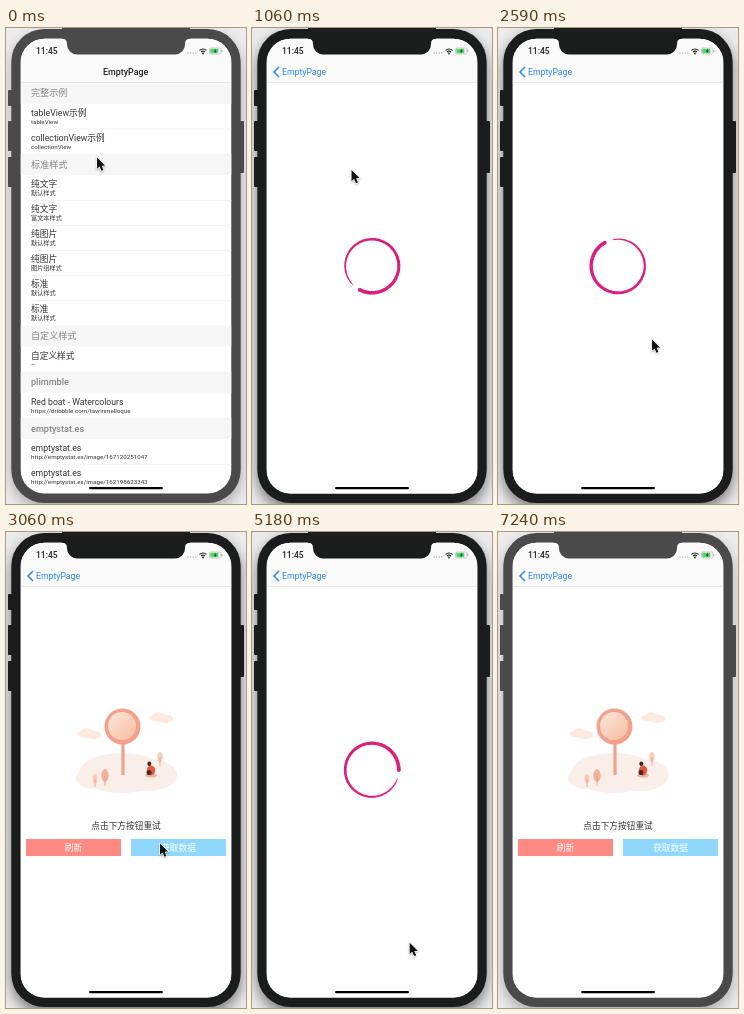
Write an HTML page with a canvas that moves like this. It is 240x476 px and loops after 8.29 s.

```html
<!DOCTYPE html>
<html lang="zh-CN">
<head>
<meta charset="utf-8">
<title>EmptyPage</title>
<style>
html, body { margin: 0; width: 100%; height: 100%; overflow: hidden; background: #ececec; }
canvas { display: block; width: 240px; height: 476px; }
</style>
</head>
<body>
<canvas id="stage"></canvas>
<script>
const LOOP = 8290;
const LEFT = 14.5, WIDTH = 211, TOP = 10.7, NAV = 54.5;
const BLUE = '#2b87f0', PINK = '#d91c7c';
const canvas = document.getElementById('stage');
const dpr = window.devicePixelRatio || 1;
canvas.width = 240 * dpr;
canvas.height = 476 * dpr;
const c = canvas.getContext('2d');

// Strings open a section; pairs are rows.
const LIST = [
  '完整示例', ['tableView示例', 'tableView'], ['collectionView示例', 'collectionView'],
  '标准样式', ['纯文字', '默认样式'], ['纯文字', '富文本样式'], ['纯图片', '默认样式'],
  ['纯图片', '图片组样式'], ['标准', '默认样式'], ['标准', '默认样式'],
  '自定义样式', ['自定义样式', '—'],
  'plimmble', ['Red boat - Watercolours', 'https://dribbble.com/tavrinmelloque'],
  'emptystat.es', ['emptystat.es', 'http://emptystat.es/image/167120251047'],
  ['emptystat.es', 'http://emptystat.es/image/162198623343']
];

const clamp = u => Math.max(0, Math.min(1, u));
const easeOut = u => 1 - (1 - u) ** 3;
const easeBoth = u => u * u * (3 - 2 * u);

// Value of [time, ...values] keys at time t.
function track(keys, t, ease = u => u) {
  let i = 0;
  while (i < keys.length - 2 && t >= keys[i + 1][0]) i++;
  const a = keys[i], b = keys[i + 1];
  const u = ease(clamp((t - a[0]) / (b[0] - a[0])));
  return a.slice(1).map((v, k) => v + (b[k + 1] - v) * u);
}

function rect(x, y, w, h, fill) {
  c.fillStyle = fill;
  c.fillRect(x, y, w, h);
}

function round(x, y, w, h, r, fill) {
  c.beginPath();
  c.roundRect(x, y, w, h, r);
  c.fillStyle = fill;
  c.fill();
}

function oval(x, y, rx, ry, fill) {
  c.beginPath();
  c.ellipse(x, y, rx, ry, 0, 0, 7);
  c.fillStyle = fill;
  c.fill();
}

// y is the optical middle of the line
function text(s, x, y, size = 8.7, fill = '#333', weight = 400, align = 'left') {
  c.font = `${weight} ${size}px Roboto, "Noto Sans CJK SC", "Noto Sans CJK", sans-serif`;
  c.textAlign = align;
  c.fillStyle = fill;
  c.fillText(s, x, y + size * 0.36);
}

function drawBody(active) {
  const shell = active ? '#1b1c1c' : '#4a4a4a';
  rect(0, 0, 240, 476, '#ececec');
  c.save();
  c.shadowColor = `rgba(0,0,0,${active ? 0.5 : 0.28})`;
  c.shadowBlur = 14 * dpr;
  c.shadowOffsetY = 6 * dpr;
  round(5.3, 1, 229.4, 474, 33, shell);
  c.restore();
  for (const [x, y, h] of [[2, 62, 16], [2, 93, 30], [2, 129, 30], [234, 93, 52]])
    round(x, y, 4, h, 1, shell);
  return shell;
}

function drawNotch(shell) {
  c.beginPath();
  c.moveTo(56, 0);
  c.lineTo(56, TOP);
  c.quadraticCurveTo(61, TOP, 61, TOP + 5);
  c.arcTo(61, 26.5, 72, 26.5, 10);
  c.arcTo(179, 26.5, 179, 16, 10);
  c.lineTo(179, TOP + 5);
  c.quadraticCurveTo(179, TOP, 184, TOP);
  c.lineTo(184, 0);
  c.fillStyle = shell;
  c.fill();
}

function drawStatus() {
  text('11:45', 30, 22.8, 8.5, '#222', 500);
  for (let i = 0; i < 4; i++) oval(182 + i * 2.6, 25, 0.7, 0.7, '#aaa');
  c.strokeStyle = '#222';
  c.lineWidth = 1.2;
  for (const r of [2.8, 5]) {
    c.beginPath();
    c.arc(197, 26, r, -2.35, -0.8);
    c.stroke();
  }
  oval(197, 25.5, 0.9, 0.9, '#222');
  c.lineWidth = 0.5;
  c.strokeStyle = '#999';
  c.beginPath();
  c.roundRect(203.5, 20, 11.5, 6, 1.6);
  c.stroke();
  round(204.3, 20.8, 8, 4.4, 0.8, '#4cd964');
  rect(215.5, 22, 0.8, 2, '#999');
  c.beginPath();
  for (const p of [[210, 20.5], [207.6, 23.4], [209.2, 23.4], [208.6, 25.6], [211, 22.7], [209.4, 22.7]])
    c.lineTo(...p);
  c.fillStyle = '#333';
  c.fill();
}

function drawNav(p) {
  rect(LEFT, 0, WIDTH, NAV, '#fafafa');
  rect(LEFT, NAV, WIDTH, 0.5, '#d4d4d4');
  const x = 97 - 67 * p;
  c.globalAlpha = clamp(1 - p * 1.6);
  text('EmptyPage', x, 44, 8.9, '#222', 500);
  c.globalAlpha = clamp(p * 1.2);
  text('EmptyPage', x, 44, 8.7, BLUE);
  c.strokeStyle = BLUE;
  c.lineWidth = 1.5;
  c.beginPath();
  c.moveTo(27, 39);
  c.lineTo(22, 44);
  c.lineTo(27, 49);
  c.stroke();
  c.globalAlpha = 1;
}

function drawList(picked) {
  let y = NAV;
  LIST.forEach((item, i) => {
    if (typeof item === 'string') {
      rect(LEFT, y, WIDTH, 21.2, '#f6f6f6');
      text(item, 25, y + 10.6, 9.1, '#858585', 500);
      y += 21.2;
      return;
    }
    if (picked && i === 1) rect(LEFT, y, WIDTH, 25.05, '#d8d8d8');
    text(item[0], 25, y + 9.1);
    text(item[1], 25, y + 17.7, 6.2);
    y += 25.05;
    if (Array.isArray(LIST[i + 1])) rect(25, y, 201, 0.5, '#e6e6e6');
  });
}

function drawRows(picked) {
  if (picked) rect(LEFT, NAV, WIDTH, 22.5, '#d9d9d9');
  ['点击重新加载', '点击添加行', '点击删除行'].forEach((s, i) => {
    text(s, 25, NAV + 11.6 + i * 22.4);
  });
}

// A ring that thickens towards its leading end; angle in degrees from the top.
function drawSpinner(angle) {
  const n = 72, span = 342, rad = Math.PI / 180;
  const head = (angle - 90) * rad, step = span * rad / n;
  c.strokeStyle = PINK;
  for (let i = 0; i < n; i++) {
    const a = head - (n - i) * step;
    c.lineWidth = 0.9 + 2.8 * (i / n) ** 0.6;
    c.beginPath();
    c.arc(120, 238, 26.8, a, a + step * 1.15);
    c.stroke();
  }
  oval(120 + 26.8 * Math.cos(head), 238 + 26.8 * Math.sin(head), 1.9, 1.9, PINK);
}

function cloud(x, y, fill) {
  oval(x, y, 12, 3.8, fill);
  oval(x - 2, y - 2.2, 6, 3.6, fill);
  oval(x + 5, y + 1.5, 7, 3.6, fill);
}

function tree(x, y, w, h, fill) {
  oval(x, y - h / 2, w, h / 2, fill);
  rect(x - 0.4, y - h / 2, 0.8, h / 2 + 4, '#e79a83');
}

function drawScene() {
  oval(116, 241, 43, 20, '#faeee8');
  oval(143, 243, 28, 16, '#faeee8');
  oval(88, 246, 18, 11, '#faeee8');
  cloud(155, 186, '#fde9de');
  cloud(83, 202, '#fde9de');
  rect(115.4, 209, 3.2, 34, '#f2a18d');
  oval(116.5, 194.5, 18, 18, '#f2a18d');
  const g = c.createLinearGradient(105, 183, 126, 207);
  g.addColorStop(0, '#fce3d4');
  g.addColorStop(1, '#f7bfa6');
  oval(116, 194, 14, 14, g);
  tree(99, 250, 3.6, 13, '#f5b19c');
  tree(89, 251, 2.6, 9, '#f9cdbb');
  tree(154, 230, 2.6, 10, '#f9cdbb');
  oval(145, 243.5, 6, 2, '#e9b7a4');
  oval(145, 238.5, 4.2, 5, '#e55a3d');
  oval(143, 240.5, 2.5, 2.6, '#4a2926');
  oval(143.3, 231.8, 2, 2.2, '#43272a');
}

function drawEmpty() {
  drawScene();
  text('点击下方按钮重试', 120, 294, 8.7, '#333', 400, 'center');
  rect(20, 307, 95, 17, '#ff8a84');
  rect(125, 307, 95, 17, '#8fd7fb');
  text('刷新', 67.5, 315.5, 8.7, '#fff', 400, 'center');
  text('获取数据', 172.5, 315.5, 8.7, '#fff', 400, 'center');
}

function drawCursor(t) {
  if (t > 5400) return;
  const [x, y] = track([
    [60, 91, 129], [410, 83, 87], [820, 82, 87], [1570, 154, 311], [3870, 154, 311],
    [4120, 116, 102], [4380, 92, 66], [4560, 92, 66], [5400, 171, 480]
  ], t, easeBoth);
  c.save();
  c.translate(x, y + 0.6);
  c.scale(0.92, 0.92);
  c.beginPath();
  for (const p of [[0, 0], [0, 12], [2.8, 9.6], [4.8, 14.4], [7, 13.4], [5, 8.8], [8.8, 8.6]])
    c.lineTo(...p);
  c.closePath();
  c.lineJoin = 'round';
  c.lineWidth = 1.6;
  c.strokeStyle = '#fff';
  c.shadowColor = 'rgba(0,0,0,.3)';
  c.shadowBlur = 2 * dpr;
  c.shadowOffsetY = dpr;
  c.stroke();
  c.shadowColor = 'transparent';
  c.fillStyle = '#111';
  c.fill();
  c.restore();
}

function drawPage(t) {
  if (t < 3060) drawSpinner(track([[0, -337], [760, 53], [1710, 540], [2590, 1050], [3060, 1310]], t)[0]);
  else if (t < 3590) drawEmpty();
  else if (t < 4480) drawRows(t >= 4420);
  else if (t < 6880) drawSpinner(351 + (t - 6290) * 0.56);
  else drawEmpty();
}

function draw(t) {
  c.setTransform(dpr, 0, 0, dpr, 0, 0);
  const shell = drawBody(t >= 60 && t < 7240);
  const push = easeOut(clamp((t - 640) / 310));

  c.save();
  c.beginPath();
  c.roundRect(LEFT, TOP, WIDTH, 454.8, 24);
  c.clip();
  rect(LEFT, 0, WIDTH, 476, '#fff');
  if (push < 1) {
    c.save();
    c.translate(-0.3 * WIDTH * push, 0);
    drawList(t >= 640);
    c.restore();
    rect(LEFT, NAV, WIDTH, 420, `rgba(0,0,0,${0.1 * push})`);
  }
  if (push > 0) {
    c.save();
    c.translate(WIDTH * (1 - push), 0);
    rect(LEFT, NAV, WIDTH, 420, '#fff');
    drawPage(t);
    c.restore();
  }
  drawNav(push);
  drawStatus();
  round(83, 459, 74, 2.2, 1.1, '#000');
  c.restore();
  drawNotch(shell);

  drawCursor(t);
}

function tick() {
  draw(performance.now() % LOOP);
  requestAnimationFrame(tick);
}
tick();
</script>
</body>
</html>
```
